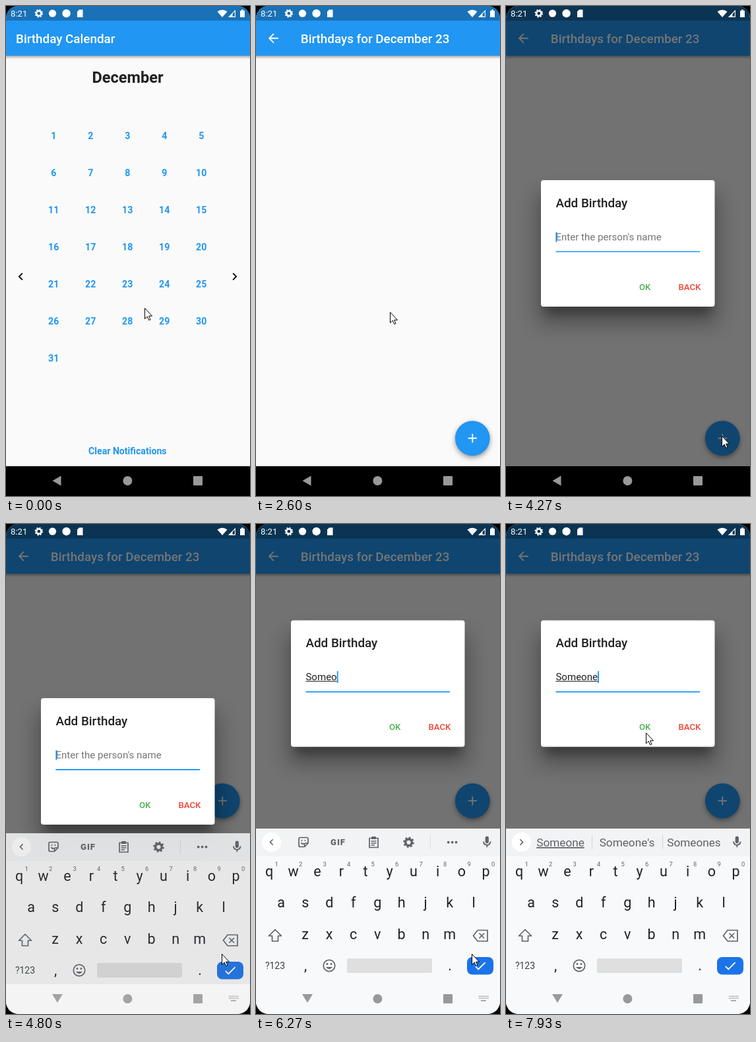
These frames come from a looping animation (370 by 740 pixels, 8 s). An HTML page:

```html
<!DOCTYPE html>
<html lang="en">
<head>
<meta charset="utf-8">
<title>Birthday Calendar</title>
<style>
  html, body { margin: 0; width: 100%; height: 100%; overflow: hidden; background: #000; }
  svg { display: block; font-family: Roboto, Arial, sans-serif; }
  .title { font-size: 18.84px; font-weight: 500; }
  .day { font-size: 14.13px; font-weight: 700; fill: #2196f3; text-anchor: middle; }
  .mid { text-anchor: middle; }
  .field { font-size: 15.07px; }
  .button { font-size: 13.19px; font-weight: 500; }
  .key { font-size: 21.5px; fill: #202124; text-anchor: middle; }
  .word { font-size: 17.2px; fill: #5f6368; text-anchor: middle; }
  .line { fill: none; stroke: #5f6368; stroke-width: 1.7; }
</style>
</head>
<body>
<svg id="stage" width="370" height="740" viewBox="0 0 370 740"></svg>
<script>
const LOOP = 8000, STEP = 1000 / 15;
const BLUE = '#2196f3', GREY = '#5f6368', NAV = '#999';

const text = (s, x, y, cls, extra = '') => `<text x="${x}" y="${y}" class="${cls}" ${extra}>${s}</text>`;
const rect = (x, y, w, h, fill, extra = '') =>
  `<rect x="${x}" y="${y}" width="${w}" height="${h}" fill="${fill}" ${extra}/>`;
const circle = (x, y, r, fill, extra = '') => `<circle cx="${x}" cy="${y}" r="${r}" fill="${fill}" ${extra}/>`;
const path = (d, extra) => `<path d="${d}" ${extra}/>`;
const group = (id, body, extra = '') => `<g id="${id}" ${extra}>${body}</g>`;
const blur = (n, a) => `opacity="${a}" style="filter:blur(${n}px)"`;

// 24-unit icon centred on a point
const icon = (d, x, y, size, fill) =>
  path(d, `fill="${fill}" transform="translate(${x - size / 2} ${y - size / 2}) scale(${size / 24})"`);

const gear = (x, y, r, color) => {
  const tooth = 2 * Math.PI * r * .82 / 16;
  return circle(x, y, r * .82, 'none', `stroke="${color}" stroke-width="${r * .36}" stroke-dasharray="${tooth}"`) +
    circle(x, y, r * .58, 'none', `stroke="${color}" stroke-width="${r * .42}"`);
};

const ICON = {
  left: 'M15.41 7.41L14 6l-6 6 6 6 1.41-1.41L10.83 12z',
  right: 'M10 6L8.59 7.41 13.17 12l-4.58 4.59L10 18l6-6z',
  back: 'M20 11H7.83l5.59-5.59L12 4l-8 8 8 8 1.41-1.41L7.83 13H20z',
  plus: 'M19 13h-6v6h-2v-6H5v-2h6V5h2v6h6z',
  check: 'M9 16.17L4.83 12l-1.42 1.41L9 19 21 7l-1.41-1.41z',
  mic: 'M12 14a3 3 0 0 0 3-3V5a3 3 0 0 0-6 0v6a3 3 0 0 0 3 3zM17 11a5 5 0 0 1-10 0H5a7 7 0 0 0 6 6.92V21h2v-3.08A7 7 0 0 0 19 11z'
};

const appBar = () => rect(0, 0, 370, 695, '#fafafa') + rect(-5, 20, 380, 57, '#000', blur(2, .4)) +
  rect(0, 0, 370, 75, BLUE);

function home() {
  let s = appBar() + text('Birthday Calendar', 15, 55.5, 'title', 'fill="#fff"') +
    text('December', 184.5, 115.5, 'mid', 'font-size="23.55" font-weight="700" fill="#212121"');
  for (let i = 0; i < 31; i++) s += text(i + 1, 72.2 + i % 5 * 56, 201 + Math.floor(i / 5) * 56, 'day');
  return s + text('Clear Notifications', 184.3, 676.5, 'day') +
    icon(ICON.left, 22.3, 408.6, 22.6, '#000') + icon(ICON.right, 346.7, 408.6, 22.6, '#000');
}

function list() {
  const fab = circle(328.3, 655.5, 26, '#000', blur(3, .3)) + circle(328.3, 657, 26, '#000', blur(6, .16)) +
    circle(328.3, 652.8, 26.4, BLUE) + circle(328.3, 652.8, 0, '#fff', 'id="splash" opacity=".2"') +
    icon(ICON.plus, 328.3, 652.8, 22.6, '#fff');
  return appBar() + icon(ICON.back, 26.3, 48.7, 22.6, '#fff') +
    text('Birthdays for December 23', 67.8, 55.5, 'title', 'fill="#fff"') + group('fab', fab);
}

function dialog() {
  return rect(60, 280, 250, 185, '#000', 'rx="4" ' + blur(7, .25)) +
    rect(48, 284, 274, 196, '#000', 'rx="8" ' + blur(16, .3)) +
    rect(53, 263, 263.5, 191, '#fff', 'rx="3.8"') +
    text('Add Birthday', 75.4, 303.5, 'title', 'fill="#212121"') +
    text("Enter the person's name", 75.4, 353.5, 'field', 'id="hint" fill="#757575"') +
    text('', 75.4, 353.5, 'field', 'id="typed" fill="#212121"') +
    rect(75.4, 354.5, 0, 1, '#212121', 'id="compose"') +
    rect(75.4, 341.5, 1.9, 15, BLUE, 'id="caret"') +
    rect(75.4, 370, 218.6, 1.9, BLUE, 'id="underline"') +
    text('OK', 202, 428.7, 'button', 'fill="#4caf50"') + text('BACK', 261.5, 428.7, 'button', 'fill="#f44336"');
}

function toolbar() {
  let s = icon(ICON.left, 23.5, 480.5, 19, GREY) +
    path('M79 482V475.5Q79 473.5 77 473.5H67Q65 473.5 65 475.5V485.5Q65 487.5 67 487.5H73.5ZM79 482H75.5Q73.5 482 73.5 484V487.5M68.5 481Q70 484 73 482.5', 'class="line"') +
    circle(69.5, 478, 1, GREY) + circle(74.5, 478, 1, GREY) +
    text('GIF', 124.5, 485, 'mid', `font-size="13" font-weight="900" letter-spacing="1" fill="${GREY}"`) +
    path('M172 474.5H185V488.5H172ZM174.5 479H182.5M174.5 482H182.5M174.5 485H180', 'class="line" stroke-width="1.4"') +
    rect(175, 472, 7, 4, GREY, 'rx="1"') + gear(231.5, 480.7, 8.3, GREY) + rect(264, 470, 1, 21, '#dadce0');
  for (let i = 0; i < 3; i++) s += circle(291.7 + i * 5.9, 480.7, 1.9, GREY);
  return s;
}

function words() {
  return icon(ICON.right, 23.5, 480.5, 19, GREY) + rect(130, 470, 1, 21, '#d0d3d6') + rect(237, 470, 1, 21, '#d0d3d6') +
    [82.5, 183.5, 285].map((x, i) => text('', x, 487, 'word word-item', i ? '' : 'text-decoration="underline"')).join('');
}

function keyboard() {
  let s = rect(0, 460, 370, 280, '#f8f9fa') + rect(0, 460, 370, 42, '#f1f3f4') + circle(23.5, 480.5, 14.5, '#fff') +
    group('tools', toolbar()) + group('words', words()) + icon(ICON.mic, 350.3, 480.3, 21, GREY);
  [['qwertyuiop', 20], ['asdfghjkl', 38.2], ['zxcvbnm', 74.6]].forEach(([row, x0], r) => {
    [...row].forEach((c, i) => {
      const x = x0 + i * 36.5;
      s += text(c, x, 531.5 + r * 47.5, 'key letter');
      if (!r) s += text((i + 1) % 10, x + 11.2, 517, 'mid', `font-size="9.4" fill="${GREY}"`);
    });
  });
  return s +
    path('M29 612.5L38.5 622H33.5V630H24.5V622H19.5Z', 'class="line" id="shift" stroke-linejoin="round"') +
    path('M336 613.5H351V630H336L329.5 621.7ZM338.5 618L346 625.5M346 618L338.5 625.5', 'class="line"') +
    text('?123', 29, 672.3, 'mid', 'font-size="14" fill="#3c4043"') + text(',', 75, 674, 'key') + text('.', 294, 674, 'key') +
    circle(111, 667, 8.7, 'none', 'class="line"') + circle(108, 664.5, 1.4, GREY) + circle(114, 664.5, 1.4, GREY) +
    path('M106 669Q111 675.5 116 669Z', `fill="${GREY}"`) +
    rect(138, 656, 129, 22, '#dfdfdf', 'rx="2.5"') + rect(320, 654, 40, 26.5, '#1a73e8', 'rx="8"') +
    icon(ICON.check, 340, 667.3, 22, '#fff');
}

const navShapes = circle(184.4, 717, 7, NAV) + rect(284, 710, 14, 14, NAV, 'rx="1"');

function lightNav() {
  let s = rect(0, 695, 370, 45, '#f8f9fa') + path('M70 710H86L78 723Z', `fill="${NAV}"`) + navShapes;
  for (let i = 0; i < 14; i++) s += rect(338 + i % 7 * 2.2, 712.5 + Math.floor(i / 7) * 3, 1.3, 1.6, NAV);
  return s + rect(341, 719, 8, 1.6, NAV);
}

const status = rect(0, 0, 370, 22, '#000', 'opacity=".25"') +
  text('8:21', 7, 16, '', 'font-size="13.2" fill="#fff"') + gear(49.8, 11.2, 6.3, '#fff') +
  circle(70.5, 11.2, 5.6, '#fff') + circle(91.6, 11.2, 6.2, '#fff') +
  path('M111 5.5H116.5V17H108V8.5Z', 'fill="#fff"') +
  path('M328 17L320.5 8.5Q328 2.8 335.5 8.5Z', 'fill="#fff"') +
  path('M338.2 16.4H347.4V7.2Z', 'fill="none" stroke="#fff" stroke-width="1.1"') +
  path('M337.5 17L343.5 11V17Z', 'fill="#fff"') +
  path('M355 7H357V5.5H360V7H362V17H355Z', 'fill="#fff"');

const stage = document.getElementById('stage');
stage.innerHTML =
  '<clipPath id="screen"><rect width="370" height="740" rx="19"/></clipPath>' +
  group('device',
    group('home', home()) + group('list', list()) +
    group('modal', rect(0, 0, 370, 740, '#000', 'opacity=".54"') + group('dialog', dialog())) +
    status + rect(0, 695, 370, 45, '#000') + path('M70.5 717L83.5 709.5V724.5Z', `fill="${NAV}"`) + navShapes +
    group('keys', keyboard()) + group('lightNav', lightNav()),
    'clip-path="url(#screen)"') +
  group('pointer', path('M.5 .5V16.5L4.2 13L6.7 18.5L9 17.5L6.6 12.2H11.5Z', 'fill="#fff" stroke="#000"'));

const el = {};
stage.querySelectorAll('[id]').forEach(e => el[e.id] = e);
const letters = [...stage.querySelectorAll('.letter')];
const wordItems = [...stage.querySelectorAll('.word-item')];
const plain = letters.map(e => e.textContent);

// Tables are keyed by step (1/15 s)
const smooth = p => p * p * (3 - 2 * p), easeOut = p => p * (2 - p);
const POINTER = [
  [9, 210, 456], [17, 189, 424, smooth], [38, 189, 424], [39, 203, 462],
  [49, 327, 649, easeOut], [106, 327, 649], [119, 212, 315, smooth]
];
const PAGE = [[0, 0, 0], [30, .62, 10], [31, 1, .5], [34, 1, 0]];
const SPLASH = [[0, 0], [58, 17], [61, 26.4], [64, 0]];
const KEYS = [[0, 0, 60], [70, .3, 45], [71, .6, 22], [72, .87, 7], [73, 1, 0]];
const LIFT = [[0, 0], [73, -42], [74, -96], [75, -117.5]];
const TYPED = [[0, ''], [83, 'S'], [86, 'So'], [92, 'Som'], [93, 'Some'], [94, 'Someo'], [98, 'Someon'], [99, 'Someone']];
const COMPOSE = [[0, 0], [88, 1], [98, 0], [103, 1]];
const WORDS = [
  [0, null], [91, ['So', 'Some', 'Song']], [92, null],
  [97, ['Someo', 'Someone', 'Someones']], [98, null], [104, ['Someone', "Someone's", 'Someones']]
];

const at = (table, k) => table.filter(row => row[0] <= k).pop();
const within = (k, a, b) => k >= a && k < b;
const show = (e, on) => e.setAttribute('visibility', on ? 'inherit' : 'hidden');
const move = (e, x, y) => e.setAttribute('transform', `translate(${x} ${y})`);

function pointerAt(k) {
  const next = POINTER.findIndex(p => p[0] > k);
  if (next === 0) return POINTER[0].slice(1);
  if (next < 0) return POINTER[POINTER.length - 1].slice(1);
  const a = POINTER[next - 1], b = POINTER[next];
  const p = (b[3] || (v => v))((k - a[0]) / (b[0] - a[0]));
  return [1, 2].map(i => Math.round(a[i] + (b[i] - a[i]) * p));
}

function render(k) {
  const [, alpha, drop] = at(PAGE, k);
  show(el.home, alpha < 1);
  show(el.list, alpha > 0);
  el.list.setAttribute('opacity', alpha);
  move(el.list, 0, drop);
  move(el.fab, 0, k >= 71 ? -234.7 : 0);
  el.splash.setAttribute('r', at(SPLASH, k)[1]);

  show(el.modal, k >= 64);
  move(el.dialog, 0, at(LIFT, k)[1]);
  el.underline.setAttribute('opacity', k === 64 ? .8 : 1);

  const [, fade, slide] = at(KEYS, k);
  for (const g of [el.keys, el.lightNav]) {
    show(g, fade > 0);
    g.setAttribute('opacity', fade);
  }
  move(el.keys, 0, slide);
  const caps = within(k, 82, 85);
  letters.forEach((e, i) => e.textContent = caps ? plain[i].toUpperCase() : plain[i]);
  el.shift.style.fill = caps ? GREY : 'none';

  const typed = at(TYPED, k)[1];
  el.typed.textContent = typed;
  const width = typed ? el.typed.getComputedTextLength() : 0;
  show(el.hint, !typed);
  el.compose.setAttribute('width', at(COMPOSE, k)[1] ? width : 0);
  el.caret.setAttribute('x', 75.4 + width);
  el.caret.setAttribute('y', typed ? 339.7 : 341.5);
  el.caret.setAttribute('height', typed ? 17.8 : 15);
  show(el.caret, !within(k, 78, 82) && !within(k, 107, 114));

  const list = at(WORDS, k)[1];
  show(el.tools, !list);
  show(el.words, !!list);
  wordItems.forEach((e, i) => e.textContent = list ? list[i] : '');
  move(el.pointer, ...pointerAt(k));
}

function tick() {
  // small lead so rounded step times land on their step
  render(Math.floor((performance.now() % LOOP + 4) / STEP) % 120);
  requestAnimationFrame(tick);
}
tick();
</script>
</body>
</html>
```
